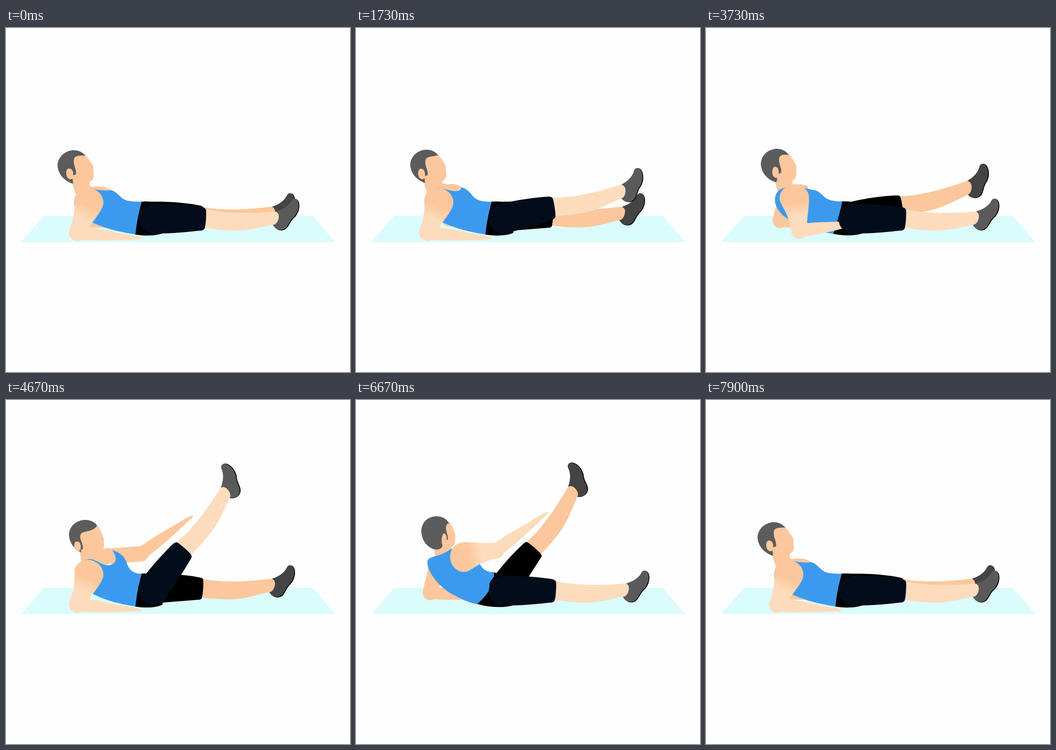
Animation of 720 by 720 pixels, one loop 8000 ms. Source, as an HTML page:

```html
<!DOCTYPE html>
<html lang="en">
<head>
<meta charset="utf-8">
<title>Alternating leg raise</title>
<style>
  html, body { margin: 0; width: 100%; height: 100%; overflow: hidden; background: #fefefe; }
  svg { display: block; width: 100vw; height: 100vh; }
  .tan { fill: #fcc79c; }
  .peach { fill: #fcdcbc; }
  .hair { fill: #5c5c5c; }
  .shirt { fill: #3c9aee; }
  .black { fill: #000; }
  .shorts { fill: #030c1a; }
  .shoe { fill: #5a5a5a; }
  .far-shoe { fill: #444; }
</style>
</head>
<body>
<svg viewBox="0 0 720 720">
  <defs>
    <linearGradient id="fade" gradientUnits="userSpaceOnUse" x1="10" x2="38" y1="0" y2="0">
      <stop stop-color="#fcc79c"/>
      <stop offset="1" stop-color="#fcdcbc"/>
    </linearGradient>
    <path id="calf" d="M416 378C445 387 500 390 563 384Q572 386 571 396Q570 406 563 411C530 418 500 426 470 424C445 423 430 420 412 418Z"/>
    <path id="shoe" d="M565 384C580 380 592 372 597 362C600 356 608 355 611 362C615 372 611 386 604 394C594 402 592 412 586 418C578 426 563 424 558 410C568 408 572 398 571 392Q570 386 565 384Z"/>
  </defs>

  <path fill="#dafcfc" d="M80 393H642L689 448H32Z"/>

  <g class="tan">
    <path id="farUpper"/>
    <path id="farFore"/>
  </g>

  <path id="face" class="tan"/>
  <path id="hair" class="hair"/>
  <path id="ear" class="tan"/>
  <path id="pelvis" class="black"/>
  <path id="top" class="shirt"/>

  <path id="nearFore" class="peach"/>
  <path id="nearUpper" fill="url(#fade)"/>

  <g id="farLeg">
    <g transform="translate(-8 -7) rotate(-2 480 400)">
      <use href="#shoe" class="black" x="1.5" y="1"/>
      <use href="#shoe" class="far-shoe"/>
      <use href="#calf" class="tan"/>
    </g>
    <path class="black" d="M300 364C340 362 385 367 408 372Q413 373 413 379C413 395 412 405 410 414Q409 418 403 418C380 420 350 422 330 424C300 428 284 410 286 388C288 372 292 364 300 364Z"/>
  </g>

  <g id="nearLeg">
    <use href="#shoe" class="black" x="1.5" y="1"/>
    <use href="#shoe" class="shoe"/>
    <use href="#calf" class="peach"/>
    <path class="shorts" d="M310 368C340 367 385 371 411 375Q419 377 419 383C419 400 418 410 416 419Q414 424 407 424C380 427 345 430 325 430C300 436 278 422 278 402C278 382 290 369 310 368Z"/>
  </g>
</svg>

<script>
const $ = id => document.getElementById(id);
const LOOP = 8000, LIFT = 72.5, POSE_AT = 0.737;

// Each part: resting outline, near-leg pose, far-leg pose.
const parts = {
  face: [
    'M166 266C172 273 178 282 182 288C185 292 182 296 183 301C185 312 183 319 176 321C174 326 175 332 178 333C200 330 212 333 219 339C205 350 160 350 146 348C142 338 140 330 138 322C120 305 130 262 166 266Z',
    'M191 262C196 268 202 280 204 288C206 293 204 296 205 299C207 308 204 313 199 314C200 312 203 311 206 311C215 308 220 310 224 314C235 350 205 350 160 342C157 335 156 325 155 318C140 305 150 262 191 262Z',
    'M197 257C201 262 204 268 205 274C208 280 208 280 208 284C208 295 207 304 200 309C199 311 200 311 200 312C200 312 200 312 202 315C200 330 175 330 166 328C165 322 164 318 164 312C160 290 175 258 197 257Z'
  ],
  hair: [
    'M166 267C158 257 146 255 138 256C118 259 107 275 108 290C110 308 124 321 140 326C141 320 139 316 138 312C140 308 143 307 146 307C150 298 138 285 143 272C148 266 158 267 166 267Z',
    'M191 263C186 254 174 251 165 251C145 252 132 266 132 283C133 299 143 312 157 319C158 316 157 313 156 310C157 313 159 314 161 312C163 300 150 288 158 279C165 274 182 276 191 263Z',
    'M197 262C192 248 180 243 168 243C148 244 137 258 137 275C138 296 152 312 170 313C178 312 181 309 181 305C185 300 190 293 193 291C193 280 186 270 190 262C192 257 195 256 197 262Z'
  ],
  ear: [
    'M132 294C140 294 142 304 140 312C138 321 126 316 126 304C126 298 128 294 132 294Z',
    'M149 296C156 296 158 305 156 312C154 320 143 316 143 305C143 299 145 296 149 296Z',
    'M185 279C190 280 191 288 190 296C189 306 180 310 180 296C180 286 182 279 185 279Z'
  ],
  pelvis: [
    'M280 364C295 362 305 363 318 366L330 429C315 435 290 436 269 432Z',
    'M280 364C295 362 305 363 318 370L328 428C315 435 290 436 269 432Z',
    'M285 360C295 362 305 365 318 370L328 430C310 435 280 435 251 426Z'
  ],
  top: [
    'M143 372C141 350 152 336 172 335C182 336 195 340 205 340C210 341 216 340 219 339C230 342 236 350 243 356C255 365 270 363 284 364C278 385 273 410 271 432C235 427 205 418 180 407C165 400 150 395 143 372Z',
    'M146 372C143 350 155 335 174 333C190 333 198 345 212 346C230 346 236 332 222 314C238 318 250 328 253 342C260 360 270 363 284 364C278 385 273 410 271 432C235 427 205 418 180 405C165 400 150 395 146 372Z',
    'M150 345C148 332 152 331 172 325C185 321 192 316 200 311C215 318 235 335 248 340C254 337 257 338 259 342C264 354 274 360 289 361C290 385 275 410 253 427C235 424 220 416 205 408C180 397 153 365 150 345Z'
  ]
};

const lerp = (a, b, f) => a + (b - a) * f;

function mix(from, to, f) {
  const ends = to.match(/\d+/g);
  let i = 0;
  return from.replace(/\d+/g, n => lerp(+n, +ends[i++], f).toFixed(2));
}

// Cubic bezier (.3,.2)(.5,1)
function ease(x) {
  const curve = (a, b, s) => 3 * (1 - s) ** 2 * s * a + 3 * (1 - s) * s * s * b + s ** 3;
  let lo = 0, hi = 1;
  for (let i = 0; i < 24; i++) {
    const mid = (lo + hi) / 2;
    if (curve(0.3, 0.5, mid) < x) lo = mid; else hi = mid;
  }
  return x >= 1 ? 1 : curve(0.2, 1, lo);
}

// r: shoulder radius, e: elbow half width, f: forearm half width
function shapeArm(side, r, e, f, length) {
  const low = r * 1.2;
  $(side + 'Upper').setAttribute('d',
    `M0 ${-r}A${r} ${r * 1.1} 0 0 0 0 ${low}C12 ${low} 30 ${e} ${length} ${e}A${e} ${e} 0 0 0 ${length} ${-e}C45 ${-e} 20 ${-r} 0 ${-r}Z`);
  $(side + 'Fore').setAttribute('d',
    `M0 ${-f}C40 ${-f} 60 -10 90 -7C110 -5 130 -4 135 -1Q135 3 128 3C100 6 50 ${f} 0 ${f}A${f} ${f} 0 0 1 0 ${-f}Z`);
}

function poseArm(side, x, y, upper, fore, length) {
  const a = upper * Math.PI / 180;
  const ex = x + length * Math.cos(a), ey = y + length * Math.sin(a);
  $(side + 'Upper').setAttribute('transform', `translate(${x} ${y}) rotate(${upper})`);
  $(side + 'Fore').setAttribute('transform', `translate(${ex} ${ey}) rotate(${fore})`);
}

const foreAngle = p => 5 - 80 * p + 32 * p * p;

function draw(t) {
  const k = Math.floor((t - 300) / 1000);
  let near = 0, far = 0;
  if (k >= 0) {
    const e = ease((t - 300 - k * 1000) / (k === 7 ? 600 : 690));
    const p = k % 2 ? 1 - e : e;
    if (k % 4 < 2) near = p; else far = p;
  }

  const pose = far > 0 ? 2 : 1;
  const f = (near + far) / POSE_AT;
  for (const id in parts) $(id).setAttribute('d', mix(parts[id][0], parts[id][pose], f));

  const nf = near / POSE_AT, ff = far / POSE_AT;
  poseArm('far', 171 + 52 * nf, 345 - 20 * nf, 105 - 148 * near, foreAngle(near), 60);
  poseArm('near', 176 + 49 * ff, 364 - 38 * ff, 113 - 168 * far, foreAngle(far), 70);
  $('nearLeg').setAttribute('transform', `rotate(${-LIFT * near} 306 400)`);
  $('farLeg').setAttribute('transform', `rotate(${-LIFT * far} 307 391)`);
}

shapeArm('far', 15, 16, 13, 60);
shapeArm('near', 28, 17, 14, 70);

const start = performance.now();
function tick() {
  draw((performance.now() - start) % LOOP);
  requestAnimationFrame(tick);
}
tick();
</script>
</body>
</html>
```
